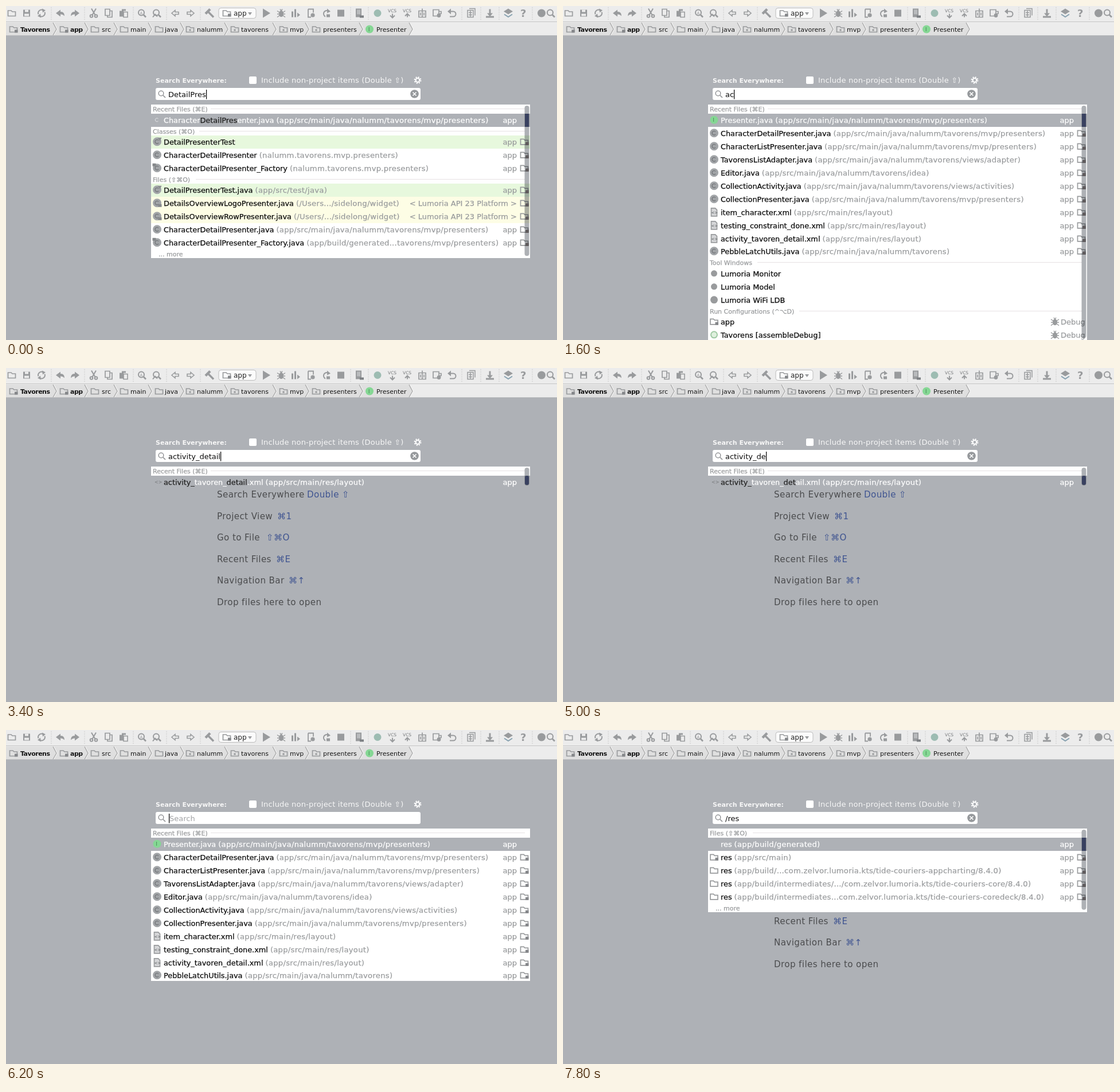
Recreate the animation shown at these times as an HTML page. Size 961 by 583 pixels, loop 8 s.

```html
<!DOCTYPE html>
<html lang="en">
<head>
<meta charset="utf-8">
<title>Search everywhere</title>
<style>
html, body { margin: 0; width: 100%; height: 100%; overflow: hidden; background: #aeb1b6; }
svg { display: block; width: 961px; height: 583px; }
text { font-family: "DejaVu Sans", sans-serif; white-space: pre; }
#list text { stroke-width: .25px; }
.path { font-size: 13.15px; letter-spacing: .28px; }
.thumb { mix-blend-mode: multiply; }
.i { fill: none; stroke: #999b9d; stroke-width: 2; }
.f { fill: #999b9d; stroke: none; }
</style>
</head>
<body>
<svg viewBox="0 0 961 583">
  <rect width="961" height="583" fill="#aeb1b6"/>
  <g id="bars"></g>
  <g id="welcome"></g>
  <g id="popup"></g>
  <g id="list"></g>
  <g id="field"></g>
</svg>
<script>
const $ = id => document.getElementById(id);
const GRAY = '#999b9d', PAGE = '#aeb1b6', SOFT = '#999b9d';
const esc = s => s.replace(/</g, '&lt;');
const rect = (x, y, w, h, fill, more = '') =>
  `<rect x="${x}" y="${y}" width="${w}" height="${h}" fill="${fill}" ${more}/>`;
const circle = (x, y, r, fill, more = '') =>
  `<circle cx="${x}" cy="${y}" r="${r}" fill="${fill}" ${more}/>`;
const text = (x, y, size, fill, str, more = '') =>
  `<text x="${x}" y="${y}" font-size="${size}" fill="${fill}" ${more}>${str}</text>`;
const at = (x, y, inner) => `<g transform="translate(${x} ${y})">${inner}</g>`;
const line = (d, more = '') => `<path class="i" d="${d}" ${more}/>`;
const solid = d => `<path class="f" d="${d}"/>`;
const inked = color => `stroke="${color}"`;
const BOLD = 'font-weight="bold"';

// ---- icons, centred on 0,0 ----
const folder = (mark = '') =>
  line('M-6.5 -4.5H-1L1 -2.5H6.5V5H-6.5Z', 'style="stroke-width:1.7"') + mark;
const moduleMark = rect(2, 1, 5.5, 5, '#85878a');
const packageMark = circle(0, 1.5, 1.8, GRAY);
const lens = line('M3 3L7 7', 'style="stroke-width:2.6"') + circle(-1, -1, 5, 'none', `stroke="${GRAY}" stroke-width="2"`);
const arrow = solid('M-8 0L0 -6V-2.5Q7 -3 7 5Q4 1.5 0 2V6Z');
const hollowArrow = line('M-6 0L0 -5V-2H6V2H0V5Z', 'style="stroke-width:1.6"');
const flip = s => `<g transform="scale(-1 1)">${s}</g>`;
const down = solid('M-1.5 -7H1.5V0H5L0 6L-5 0H-1.5Z');
const sheet = `<path d="M-5 -7H2L5 -4V7H-5Z" fill="#d5d6d8" stroke="${GRAY}" stroke-width="1.700"/>`;
const bug = `<ellipse class="f" cx="0" cy="1" rx="4" ry="5.5"/>` +
  line('M-7 -4L-3 -1M7 -4L3 -1M-7 1.5H7M-7 7L-3 4M7 7L3 4M-2 -7L0 -4L2 -7', 'style="stroke-width:1.4"');
const vcs = tip => text(-8, -1.5, 7.5, '#77797b', 'VCS') + line('M0 1V7' + tip, 'style="stroke-width:2"');
const interfaceIcon = circle(0, 0, 7, '#85d794') + text(-1.9, 3, 8, '#3f7d4c', 'I');
const classIcon = circle(0, 0, 7.5, '#a2a5a8') +
  `<path d="M2.6 -2.2A3.4 3.4 0 1 0 2.6 2.2" fill="none" stroke="#74777b" stroke-width="1.4"/>`;

const toolbar = [
  [10, folder()],
  [36, solid('M-6 -6H6V6H-6Z') + rect(-3, -6, 6, 4, '#ececec') + rect(-4, 1, 8, 4, '#ececec')],
  [62, line('M-5.5 2A5.8 5.8 0 0 1 3 -5M5.5 -2A5.8 5.8 0 0 1 -3 5') + solid('M1 -8L7 -5L2 -1ZM-1 8L-7 5L-2 1Z')],
  [95, arrow], [120, flip(arrow)],
  [153, line('M-4 -8L3 4M4 -8L-3 4') + circle(-4, 5, 2.3, 'none', `stroke="${GRAY}" stroke-width="2"`) +
    circle(4, 5, 2.3, 'none', `stroke="${GRAY}" stroke-width="2"`)],
  [179, line('M-6 -7H2V4H-6ZM2 -4H6V7H-2V4', 'style="stroke-width:1.7"')],
  [205, solid('M-7 -4H-3V-7H4V-4H0V6H-7Z') + line('M0 -2H7V7H0Z', 'style="stroke-width:1.6"')],
  [237, lens + text(-3.5, 2, 7, GRAY, 'A')], [263, lens + line('M-7 7L-3 2L1 6')],
  [295, hollowArrow], [322, flip(hollowArrow)],
  [355, line('M-2 -2L7 7', 'style="stroke-width:3.4"') + line('M-7 1L1 -7', 'style="stroke-width:4.5"')],
  [454, solid('M-6 -8L7 0L-6 8Z')], [480, bug],
  [505, solid('M-7 -3H-4V7H-7ZM-2 -7H1V7H-2ZM3 -1L8 3L3 7Z')],
  [532, line('M-5 -7H4V-1M-5 -7V7H0', 'style="stroke-width:1.8"') + circle(3, 3.5, 3.6, GRAY)],
  [558, line('M4 -4A5.5 5.5 0 1 0 -1 6') + solid('M2 -8L8 -3L2 0Z') + rect(1, 2, 6, 5, GRAY)],
  [584, rect(-6, -6, 12, 12, GRAY)],
  [616, rect(-6, -8, 10, 15, GRAY) + rect(-4, -6, 6, 8, '#b9bbbd') + rect(1, 4, 7, 4, '#7d8083')],
  [648, circle(0, 0, 6.5, '#9dbcb2')],
  [674, vcs('M-4 4L0 8L4 4')], [700, vcs('M-4 5L0 1L4 5')],
  [726, line('M-6 -4H6V7H-6ZM0 -8V7M-3 -1V4M3 -1V4', 'style="stroke-width:1.7"')],
  [752, line('M-7 -6H3V5H-7ZM3 -3H7V1H3', 'style="stroke-width:1.7"') + circle(3, 4, 3.4, GRAY)],
  [778, line('M-4 -3H2A4.5 4.5 0 0 1 2 6H-4') + solid('M-2 -8V2L-8 -3Z')],
  [811, line('M-6 -5H4V7H-6ZM-3 -8H7V4M-4 -1H2M-4 3H2M-1 -4V6', 'style="stroke-width:1.5"')],
  [844, down + rect(-7, 5, 14, 3, GRAY)],
  [876, solid('M0 -8L8 -3L0 2L-8 -3Z') + line('M-7 2L0 6.5L7 2', 'style="stroke:#88a2b0"')],
  [902, text(-5, 6.5, 18, GRAY, '?', BOLD)],
  [934, circle(0, 0, 7, GRAY)], [950, lens]
];
const dividers = [79, 137, 222, 280, 339, 601, 632, 795, 828, 860, 918];

// icon x, text x, label, chevron x, icon mark
const crumbs = [
  [13, 25, 'Tavorens', 82, moduleMark], [101, 112, 'app', 137, moduleMark],
  [155, 167, 'src', 188], [206, 217, 'main', 248], [267, 277, 'java', 304],
  [321, 333, 'nalumm', 381, packageMark], [399, 410, 'tavorens', 465, packageMark],
  [484, 495, 'mvp', 522, packageMark], [541, 553, 'presenters', 616, packageMark],
  [634, 646, 'Presenter', 703]
];

function drawBars() {
  let s = rect(0, 0, 961, 52, '#ececec') + rect(0, 27, 961, 1, '#c4c4c4');
  s += dividers.map(x => `<path d="M${x} 2V25" stroke="#b4b4b4" stroke-dasharray="1 2"/>`).join('');
  s += toolbar.map(([x, icon]) => at(x, 12.5, icon)).join('');
  s += rect(371, 3.5, 65, 18, '#fbfbfb', 'rx="4" stroke="#bcbcbc"') + at(385, 12.5, folder(moduleMark)) +
    text(397, 17, 12, '#222', 'app') + `<path d="M422 11H429L425.500 16Z" fill="${GRAY}"/>`;
  s += '<path d="M0 29H703L709 40.500L703 51H0Z" fill="#dfdfdf"/>';
  crumbs.forEach(([ix, tx, label, cx, mark], n) => {
    s += at(ix, 40.5, label === 'Presenter' ? interfaceIcon : folder(mark));
    s += text(tx, 45, 11, '#161616', label, n < 2 ? BOLD + ' letter-spacing="-.5"' : '');
    s += `<path d="M${cx + 1.5} 29L${cx + 7.5} 40.500L${cx + 1.5} 51" fill="none" stroke="#f8f8f8"/>` +
      `<path d="M${cx} 29L${cx + 6} 40.500L${cx} 51" fill="none" stroke="#a5a5a5" stroke-width="1.200"/>`;
  });
  $('bars').innerHTML = s + rect(0, 51, 961, 1, '#bcbdbf');
}

function drawWelcome() {
  const tips = [
    ['Search Everywhere', 525, 'Double ⇧'], ['Project View', 473, '⌘1'], ['Go to File', 454, '⇧⌘O'],
    ['Recent Files', 471, '⌘E'], ['Navigation Bar', 493, '⌘↑'], ['Drop files here to open', 560, '']
  ];
  const wide = 'letter-spacing=".4"';
  $('welcome').innerHTML = tips.map(([label, x, keys], n) => {
    const y = 226 + n * 37.6;
    return text(368, y, 15.1, '#4b4c4e', label, wide) + text(x, y, 15.1, '#405591', keys, wide);
  }).join('');
}

function drawPopup() {
  $('popup').innerHTML =
    text(261, 134, 11, '#f7f7f7', 'Search Everywhere:', BOLD) +
    rect(424, 123, 13, 13, '#fff', 'rx="2"') +
    text(445, 134, 13, '#f7f7f7', 'Include non-project items (Double ⇧)', 'letter-spacing=".2"') +
    circle(718, 129.5, 3.4, 'none', 'stroke="#fff" stroke-width="2"') +
    circle(718, 129.5, 5.4, 'none', 'stroke="#fff" stroke-width="2" stroke-dasharray="2.1 2.14"') +
    rect(261, 143, 462, 21, '#fff', 'rx="3"') +
    at(271, 153, circle(-.5, -.5, 4.3, 'none', 'stroke="#85878a" stroke-width="1.3"') +
      line('M3 3L7 7', 'style="stroke:#85878a;stroke-width:1.5"'));
}

// ---- result rows ----
const rowIcons = {
  c: classIcon,
  t: classIcon + '<path d="M1 -7L8 -7L5 -1Z" fill="#8a8d90"/>',
  g: classIcon + rect(-8, -8, 6, 5, '#85888b'),
  l: classIcon + rect(2, 2, 6, 5, '#85888b'),
  i: interfaceIcon,
  x: sheet + text(-5, 3, 7, '#707376', '&lt;&gt;', BOLD),
  f: folder(), m: folder(moduleMark),
  d: circle(0, 0, 5.5, GRAY),
  w: circle(0, 0, 6.5, GRAY),
  s: circle(0, 0, 5.5, '#dff0df', 'stroke="#9fc9a4" stroke-width="2"'),
  C: '<path d="M2 -2A3 3 0 1 0 2 2" fill="none" stroke="#e2e3e5"/>',
  X: text(-4.5, 3, 8, '#77797c', '&lt;&gt;'),
  n: ''
};
const ROW = 22.95, HEAD = 15.3, TRIM = 2;
const JAVA = 'app/src/main/java/nalumm/tavorens/', PKG = 'nalumm.tavorens.', LAYOUT = 'app/src/main/res/layout';
const GREEN = '#e7f8dd', YELLOW = '#fdfde5';
const RECENT = ['Recent Files (⌘E)', 357], CLASSES = ['Classes (⌘O)', 337], FILES = ['Files (⇧⌘O)', 331];
const MORE = 'more';
const row = (icon, name, path = '', tint = '#fff', right = 'app') => ({ icon, name, path, tint, right });
const tool = (icon, name, right = '') => row(icon, name, '', '#fff', right);
const platform = '< Lumoria API 23 Platform >';

const presenter = row('c', 'CharacterDetailPresenter.java', JAVA + 'mvp/presenters');
const detailXml = row('x', 'activity_tavoren_detail.xml', LAYOUT);
const detailActivity = row('c', 'CharacterDetailActivity.java', JAVA + 'views/activities');
const collection = row('c', 'CollectionActivity.java', JAVA + 'views/activities');
const adapter = row('c', 'TavorensListAdapter.java', JAVA + 'views/adapter');
const itemXml = row('x', 'item_character.xml', LAYOUT);
const testClass = row('t', 'DetailPresenterTest', '', GREEN);
const binding = row('c', 'ActivityTavorenDetailBinding', PKG + 'databinding');
const bindingTest = { ...binding, tint: GREEN };
const bindingFile = row('c', 'ActivityTavorenDetailBinding.java', 'app/build/generated...databinding');
const activityClass = row('c', 'CharacterDetailActivity', PKG + 'views.activities');
const binderClass = row('c', 'CharacterDetailActivity$$ViewBinder', PKG + 'views.activities');
const pick = name => row('C', name, JAVA + 'mvp/presenters');
const xmlPick = name => row('X', name, LAYOUT);

const recent = [RECENT,
  row('i', 'Presenter.java', JAVA + 'mvp/presenters'), presenter,
  row('c', 'CharacterListPresenter.java', JAVA + 'mvp/presenters'), adapter,
  row('c', 'Editor.java', JAVA + 'idea'), collection,
  row('c', 'CollectionPresenter.java', JAVA + 'mvp/presenters'), itemXml,
  row('x', 'testing_constraint_done.xml', LAYOUT), detailXml,
  row('c', 'PebbleLatchUtils.java', JAVA.slice(0, -1))];

const tide = 'com.zelvor.lumoria.kts/tide-couriers-';
const one = [RECENT, xmlPick('{activity_}tavoren_{detail}.xml')];

// braces mark the matched letters
const lists = {
  pres: [RECENT, pick('Character{DetailPres}enter.java'),
    CLASSES, testClass, row('c', 'CharacterDetailPresenter', PKG + 'mvp.presenters'),
    row('g', 'CharacterDetailPresenter_Factory', PKG + 'mvp.presenters'),
    FILES, row('t', 'DetailPresenterTest.java', 'app/src/test/java', GREEN),
    row('l', 'DetailsOverviewLogoPresenter.java', '/Users.../sidelong/widget', YELLOW, platform),
    row('l', 'DetailsOverviewRowPresenter.java', '/Users/.../sidelong/widget', YELLOW, platform),
    presenter,
    row('g', 'CharacterDetailPresenter_Factory.java', 'app/build/generated...tavorens/mvp/presenters'), MORE],
  detail: [RECENT, pick('Character{Detail}Presenter.java'), detailXml, detailActivity],
  det: [RECENT, pick('Character{Det}ailPresenter.java'), detailXml, detailActivity,
    CLASSES, testClass, binding, bindingTest, activityClass, binderClass, MORE],
  recent,
  tools: [...recent, ['Tool Windows', 339],
    tool('d', 'Lumoria Monitor'), tool('d', 'Lumoria Model'), tool('w', 'Lumoria WiFi LDB'),
    ['Run Configurations (^⌥D)', 412], tool('m', 'app', 'Debug'), tool('s', 'Tavorens [assembleDebug]', 'Debug')],
  one,
  oneDet: [RECENT, xmlPick('{activity_}tavoren_{det}ail.xml')],
  grow: [...one, CLASSES, binding],
  full: [...one, CLASSES, binding, bindingTest, FILES, bindingFile, bindingFile],
  act: [RECENT, xmlPick('{act}ivity_tavoren_detail.xml'), collection, detailActivity, itemXml, presenter,
    adapter, CLASSES, binding, bindingTest, activityClass, binderClass,
    row('c', 'CollectionActivity', PKG + 'views.activities'), MORE],
  res: [FILES, row('n', 'res', 'app/build/generated'), row('m', 'res', 'app/src/main'),
    row('f', 'res', `app/build/...${tide}appcharting/8.4.0`),
    row('f', 'res', `app/build/intermediates/.../${tide}core/8.4.0`),
    row('f', 'res', `app/build/intermediates...${tide}coredeck/8.4.0`), MORE]
};

function drawRow(r, y, h, selected) {
  const mid = y + 10.8, base = mid + 4.7;
  const ink = selected ? '#fff' : '#0c0c0c', soft = selected ? '#fff' : SOFT;
  const name = esc(r.name).replace(/{(.*?)}/g, '<tspan fill="#222" stroke="#222">$1</tspan>');
  const path = r.path && `<tspan class="path" dx="4" fill="${soft}" stroke="${soft}">(${r.path})</tspan>`;
  let s = rect(253, y, 661, h, selected ? PAGE : r.tint) + at(263.5, mid, rowIcons[r.icon]) +
    text(275, base, 12.85, ink, name + path, inked(ink));
  if (r.right === 'Debug') return s + at(858, mid, bug) + text(868, base, 13, soft, r.right, inked(soft));
  if (r.right) {
    s += text(891, base, 13, soft, esc(r.right), 'text-anchor="end" ' + inked(soft));
    if (!selected) s += at(904, mid, folder(moduleMark));
  }
  return s;
}

function drawList(rows, bar) {
  const short = rows.length === 2;
  let y = 172, s = '', marks = '', selected = true;
  rows.forEach((r, n) => {
    const top = Math.round(y);
    if (r === MORE) {
      s += rect(253, top, 661, 15, '#fff') + text(266, top + 12, 11, SOFT, '... more', inked(SOFT));
      y += 15;
    } else if (Array.isArray(r)) {
      const [label, rule] = r;
      y += n ? HEAD : 16;
      s += rect(253, top, 661, Math.round(y) - top, '#fff') + text(256, top + 11.7, 11, SOFT, label, inked(SOFT)) +
        rect(rule, top + 7, 905 - rule, 1, '#e6e1e3');
    } else {
      y += ROW - (n === rows.length - 1 ? TRIM : 0);
      const h = Math.round(y) - top;
      s += drawRow(r, top, h, selected);
      if (selected) marks += rect(905, top, 7, short ? 16 : h, '#394160', short ? 'rx="3"' : '');
      else if (r.right && r.right !== 'Debug') marks += rect(906.5, top + 11.5, 5, 5.5, '#5f5a5c');
      selected = false;
    }
  });
  if (bar) s += rect(904.5, 174, 8, y - 178, '#aeb1b5', 'rx="4" class="thumb"') + marks;
  $('list').innerHTML = s;
}

function drawField(query, caret) {
  $('field').innerHTML = query
    ? text(283, 159, 13, '#0c0c0c', query, 'id="query"') + circle(712.5, 153.5, 7.3, '#96999c') +
      '<path d="M709.500 150.500L715.500 156.500M715.500 150.500L709.500 156.500" stroke="#fff" stroke-width="1.600"/>'
    : text(285, 158.5, 13, '#a0a2a4', 'Search');
  if (!caret) return;
  const x = query ? 283 + $('query').getComputedTextLength() : 283.5;
  $('field').innerHTML += rect(Math.round(x), 146, 1.2, 16.5, '#000');
}

// start ms, typed text, caret on, result list
const scenes = [
  [0, 'DetailPres', 1, 'pres'], [200, 'Detail', 1, 'detail'], [600, 'Det', 1, 'det'],
  [1000, '', 1, 'recent'], [1200, 'a', 1, 'recent'], [1600, 'ac', 1, 'tools'],
  [2000, 'acti', 1, 'tools'], [2200, 'activit', 1, 'tools'], [2400, 'activity', 1, 'tools'],
  [2800, 'activity_det', 1, 'tools'], [3400, 'activity_detail', 1, 'one'],
  [3800, 'activity_detail', 0, 'grow'], [4000, 'activity_detail', 0, 'full'],
  [4200, 'activity_detail', 1, 'full'], [4600, 'activity_det', 1, 'oneDet'],
  [5000, 'activity_de', 1, 'oneDet'], [5600, 'act', 1, 'act'], [6200, '', 1, 'recent'],
  [6600, '/', 1, 'recent'], [7000, '/r', 1, 'recent'], [7200, '/re', 1, 'recent'],
  [7400, '/res', 1, 'res'], [7600, '/res', 0, 'res']
];
const LOOP = 8000;
let shown;

function tick() {
  const now = performance.now() % LOOP;
  const scene = scenes.filter(s => s[0] <= now).pop();
  if (scene !== shown) {
    shown = scene;
    const [, query, caret, key] = scene;
    drawList(lists[key], query !== '');
    drawField(query, caret);
  }
  requestAnimationFrame(tick);
}

drawBars();
drawWelcome();
drawPopup();
tick();
</script>
</body>
</html>
```
